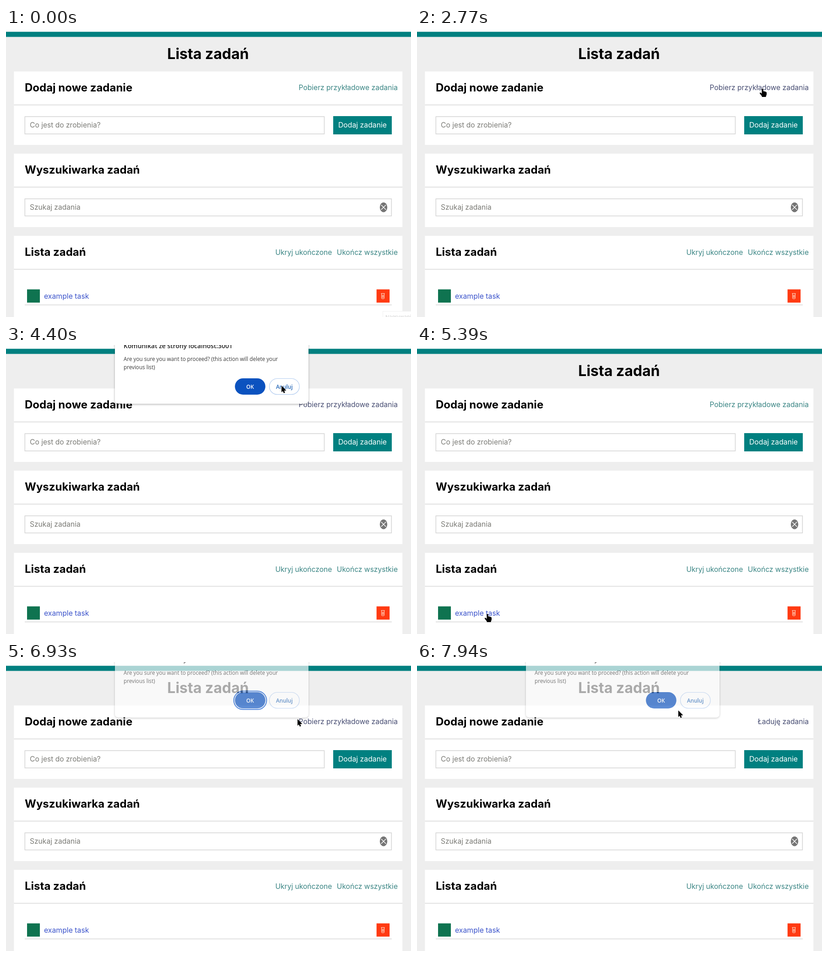
An HTML page that plays this animation: 885 px wide and 633 px high, repeating every 8 s.

```html
<!DOCTYPE html>
<html lang="pl">
<head>
<meta charset="utf-8">
<title>Lista zadań</title>
<style>
  html, body { margin: 0; width: 100%; height: 100%; overflow: hidden; background: #eee; }
  svg { display: block; width: 885px; height: 633px; }
  text { font: 400 15.8px Inter, sans-serif; font-optical-sizing: none; white-space: pre; }
  .h1 { font-size: 32px; font-weight: 700; text-anchor: middle; }
  .h2 { font-size: 24px; font-weight: 700; }
  .link { fill: #3a8584; font-size: 15.6px; text-anchor: end; }
  .hint { fill: #7b7b76; font-size: 15.6px; }
  .rule { fill: #d9d9d9; }
  .field { fill: #fff; stroke: #d6d6d6; stroke-width: 1.6; }
  #dialog text { font: 400 11.7px "Open Sans", "Noto Sans", sans-serif; fill: #3a3a3a; }
  #dialog .title { font-size: 13.9px; font-weight: 600; fill: #222; }
  #dialog .btn { font-weight: 600; text-anchor: middle; }
  #cursor path { stroke: #fff; stroke-width: .6; paint-order: stroke; stroke-linejoin: round; }
</style>
</head>
<body>
<svg viewBox="0 0 885 633">
  <defs>
    <filter id="shadow" x="-10%" y="-10%" width="120%" height="130%">
      <feDropShadow dx="0" dy="1.5" stdDeviation="2.2" flood-color="#000" flood-opacity=".32"/>
    </filter>
  </defs>
  <rect width="885" height="633" fill="#eee"/>
  <rect width="885" height="8.3" fill="#fff"/>
  <rect y="8.3" width="885" height="11.2" fill="#008080"/>
  <text class="h1" x="441.5" y="68.4">Lista zadań</text>

  <g id="cards"></g>

  <text class="link" id="load" x="856" y="136">Pobierz przykładowe zadania</text>
  <rect class="field" x="41.3" y="194.2" width="654.2" height="37.8"/>
  <text class="hint" x="52" y="217.7">Co jest do zrobienia?</text>
  <rect x="715" y="193" width="128" height="40" fill="#008080"/>
  <text x="779" y="217.7" fill="#fff" text-anchor="middle">Dodaj zadanie</text>

  <rect class="field" x="41.3" y="374.2" width="801" height="37.4"/>
  <text class="hint" x="52" y="397.7">Szukaj zadania</text>
  <ellipse cx="825" cy="392.7" rx="8.2" ry="10.8" fill="#757575"/>
  <path d="M819.8 387.5l10.4 10.4m0-10.4l-10.4 10.4" stroke="#fff" stroke-width="1.4"/>

  <text class="link" x="712.3" y="496.5">Ukryj ukończone</text>
  <text class="link" x="856" y="496.5">Ukończ wszystkie</text>
  <rect x="46" y="572.5" width="28" height="29" fill="#0f7350"/>
  <text x="83" y="592.5" fill="#3c54cb">example task</text>
  <rect x="809.7" y="572.5" width="28.5" height="29" fill="#ff3a12"/>
  <path d="M819.5 581.4h8M820.7 582v9.8q0 1.2 1.2 1.2h3.4q1.2 0 1.2-1.2v-9.8M822.6 584.5v6.5M824.6 584.5v6.5"
        fill="none" stroke="#ffe9d8"/>
  <rect class="rule" x="41" y="605.7" width="802" height="1.6"/>

  <g id="toast">
    <rect x="823.5" y="620.5" width="70" height="20" fill="#fff" stroke="#f0f0f0"/>
    <text x="829" y="637" fill="#d2d2d2" style="font-size:11px">Nagrywanie</text>
  </g>

  <g id="dialog">
    <rect x="238" y="-60" width="423" height="188.5" rx="8" fill="#fff" filter="url(#shadow)"/>
    <text class="title" x="257" y="7">Komunikat ze strony localhost:3001</text>
    <text x="257" y="34.5">Are you sure you want to proceed? (this action will delete your</text>
    <text x="257" y="53.3">previous list)</text>
    <rect id="ring" x="497.8" y="70.7" width="71.6" height="40.4" rx="20.2" fill="#fff" stroke="#0b57d0" stroke-width="2"/>
    <rect x="500.2" y="73" width="66.6" height="35.7" rx="17.8" fill="#0b52bf"/>
    <text class="btn" x="533.3" y="95.7" style="fill:#fff">OK</text>
    <rect x="575.5" y="73.5" width="65.6" height="34.8" rx="17.4" fill="#fff" stroke="#b3cdf0" stroke-width="1.2"/>
    <text class="btn" x="608.3" y="95.7" style="fill:#2467b8">Anuluj</text>
  </g>

  <g id="cursor">
    <path id="arrow" d="M0 0V14.5L3 11.8L5 16.4L7.7 15.2L5.8 10.9L10.4 10.4Z"/>
    <path id="hand" d="M-1.6 1.4Q-1.5 0 0 0Q1.5 0 1.6 1.4V5.4Q3 4.8 4.2 6Q5.6 5.4 6.7 6.7Q8.9 6.5 9 8.7V12Q9 14.5 7.6 16V18H-1.4V16.2L-6 10.6Q-6.6 9 -5.2 8.5Q-4 8.3 -2.8 9.7L-1.6 10.8Z"/>
    <path id="beam" d="M-5 -7.2H5V-4.9H1.4V4.9H5V7.2H-5V4.9H-1.4V-4.9H-5Z"/>
  </g>
</svg>
<script>
const LOOP = 8000, STEP = 80;
const el = id => document.getElementById(id);
const show = (id, on) => { el(id).style.display = on ? '' : 'none'; };
const within = (v, a, b) => v >= a && v < b;
const smooth = u => u * u * (3 - 2 * u);

el('cards').innerHTML = ['Dodaj nowe zadanie', 'Wyszukiwarka zadań', 'Lista zadań'].map((title, i) => `
  <g transform="translate(0 ${95.2 + 180 * i})">
    <rect x="17.3" width="849" height="${i < 2 ? 160.8 : 200}" fill="#fff"/>
    <rect class="rule" x="17.3" y="72.5" width="849" height="1.6"/>
    <text class="h2" x="41" y="43.9">${title}</text>
  </g>`).join('');

// Places the pointer visits
const spot = {
  entry: [692, 518], task: [154, 589], input: [680, 217.7], load: [755, 133], loadEdge: [637, 125],
  cancel: [602, 89], ok: [537, 90], aboveTask: [199, 494], away: [571, 106]
};
// Pointer moves: start, end, from, halfway point, to
const moves = [
  [320, 1040, 'entry', [430, 600], 'task'],
  [1470, 1870, 'task', [430, 400], 'input'],
  [2040, 2770, 'input', [738, 394], 'load'],
  [3270, 4070, 'load', [532, 91], 'cancel'],
  [4480, 5060, 'cancel', [420, 290], 'aboveTask'],
  [5150, 5390, 'aboveTask', [180, 545], 'task'],
  [5890, 6690, 'task', [410, 350], 'loadEdge'],
  [7010, 7270, 'loadEdge', [585, 108], 'ok'],
  [7780, 7940, 'ok', [552, 97], 'away']
];
const dialogs = [{ open: 2850, close: 4480 }, { open: 6770 + STEP, close: 7940 }];

function progress(t, start, length) {
  const steps = Math.round(length / STEP) + 1;
  const k = Math.floor((t - start) / length * (steps - 1) + 1e-6) + 1;
  return Math.max(0, Math.min(1, k / steps));
}

// Quadratic curve through three points
function along(a, b, c, u) {
  const wa = (1 - u) * (1 - 2 * u), wb = 4 * u * (1 - u), wc = u * (2 * u - 1);
  return [0, 1].map(i => wa * a[i] + wb * b[i] + wc * c[i]);
}

function pointer(t) {
  const move = moves.filter(m => t >= m[0]).pop();
  if (!move) return null;
  const [start, end, from, mid, to] = move;
  const u = progress(t, start, end - start);
  return along(spot[from], mid, spot[to], (u + smooth(u)) / 2);
}

function shape(modal, x, y) {
  if (modal) return 'arrow';
  const over = (l, top, r, b) => within(x, l, r) && within(y, top, b);
  if (over(41, 194, 696, 233) || over(41, 374, 810, 412)) return 'beam';
  if (over(636, 121, 856, 142) || over(83, 577, 185, 600) || over(715, 193, 843, 233)) return 'hand';
  return 'arrow';
}

function draw(t) {
  show('toast', t < STEP);

  const load = el('load');
  const label = t >= dialogs[1].close ? 'Ładuję zadania' : 'Pobierz przykładowe zadania';
  if (load.textContent !== label) load.textContent = label;
  load.style.fill = within(t, 2690, dialogs[0].close) || t >= 6690 ? '#474d72' : '';

  const { open, close } = dialogs.filter(d => t >= d.open).pop() || dialogs[0];
  const alpha = progress(t, open, 2 * STEP) - progress(t, close, 2 * STEP);
  show('dialog', alpha > 0);
  el('dialog').setAttribute('opacity', alpha);
  el('dialog').setAttribute('transform', `translate(0 ${-21 * (1 - alpha)})`);
  show('ring', t < open + 420);

  const pos = pointer(t);
  show('cursor', pos);
  if (!pos) return;
  // the pointer keeps its look until it moves over the first dialog
  const kind = shape(within(t, 3270, dialogs[0].close) || t >= dialogs[1].open, ...pos);
  for (const id of ['arrow', 'hand', 'beam']) show(id, id === kind);
  el('cursor').setAttribute('transform', `translate(${pos[0].toFixed(1)} ${pos[1].toFixed(1)})`);
}

const began = performance.now();
function tick() {
  draw((performance.now() - began) % LOOP);
  requestAnimationFrame(tick);
}
tick();
</script>
</body>
</html>
```
